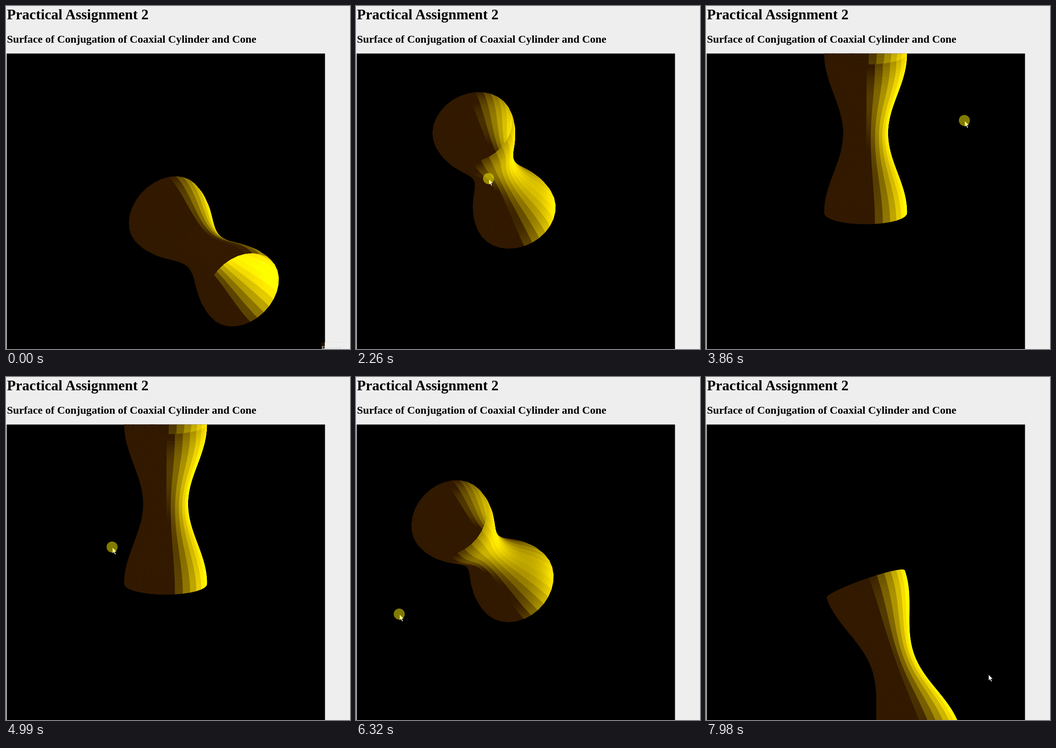
Animation of 750 by 747 pixels, one loop 8000 ms. Source, as an HTML page with a canvas:

```html
<!DOCTYPE html>
<html lang="en">
<head>
<meta charset="utf-8">
<title>Practical Assignment 2</title>
<style>
  html, body { margin: 0; width: 100%; height: 100%; overflow: hidden; background: #eee; }
  h1, h2 { position: absolute; left: 2px; margin: 0; white-space: nowrap; color: #000;
           font-family: "Liberation Serif", "Times New Roman", serif; font-weight: bold; }
  h1 { top: 0; font-size: 31.6px; line-height: 37px; }
  h2 { top: 58px; font-size: 23.76px; line-height: 28px; }
  canvas { position: absolute; left: 0; top: 0; }
</style>
</head>
<body>
<canvas id="stage" width="750" height="747"></canvas>
<h1>Practical Assignment 2</h1>
<h2>Surface of Conjugation of Coaxial Cylinder and Cone</h2>
<script>
const ctx = document.getElementById('stage').getContext('2d');
const LOOP = 8000, TAU = Math.PI * 2;
const CENTER = { x: 348, y: 451 };
const LENGTH = 360, MEAN_RADIUS = 69.25, SWELL = 20.75;
const FACETS = 31, ROWS = 48, PHASE = .07;
const LAMP = [650, 0, 0];
const DRAG_START = 530, DRAG_END = 7930;

// Turning points of the drag: time, axis of the body, pointer
const TURNS = [
  { t: DRAG_START, axis: [.463, -.463], pointer: [568, 633] },
  { t: 1610, axis: [-.186, -.04], pointer: [278, 579] },
  { t: 2130, axis: [-.265, .435], pointer: [285, 415] },
  { t: 2930, axis: [-.179, .824], pointer: [350, 225] },
  { t: 3860, axis: [0, .964], pointer: [564, 250] },
  { t: 4990, axis: [0, .968], pointer: [232, 371] },
  { t: 5580, axis: [0, .95], pointer: [475, 400] },
  { t: 5950, axis: [0, .1], pointer: [300, 676] },
  { t: 6320, axis: [-.4, .398], pointer: [95, 517] },
  { t: 6600, axis: [-.8, -.12], pointer: [90, 650] },
  { t: 7180, axis: [-.387, -.54], pointer: [420, 577] },
  { t: 7980, axis: [.33, -.937], pointer: [616, 648] }
];

const clamp = (v, lo, hi) => Math.min(hi, Math.max(lo, v));
const dot = (a, b) => a[0] * b[0] + a[1] * b[1] + a[2] * b[2];
const normalize = v => v.map(c => c / Math.hypot(...v));
const cross = (a, b) => [
  a[1] * b[2] - a[2] * b[1], a[2] * b[0] - a[0] * b[2], a[0] * b[1] - a[1] * b[0]];

function slope(i, part, k) {
  const from = TURNS[i], to = TURNS[i + 1];
  return (to[part][k] - from[part][k]) / (to.t - from.t);
}

// Harmonic mean of neighbouring slopes: smooth without overshoot
function tangent(i, part, k) {
  if (i === 0 || i === TURNS.length - 1) return slope(Math.max(0, i - 1), part, k);
  const p = slope(i - 1, part, k), q = slope(i, part, k);
  return p * q > 0 ? 2 * p * q / (p + q) : 0;
}

function valueAt(time, part) {
  const last = TURNS.length - 1, t = clamp(time, TURNS[0].t, TURNS[last].t);
  let i = 0;
  while (i < last - 1 && t >= TURNS[i + 1].t) i++;
  const from = TURNS[i], to = TURNS[i + 1], span = to.t - from.t;
  const u = (t - from.t) / span, u2 = u * u, u3 = u2 * u;
  return [0, 1].map(k =>
    (2 * u3 - 3 * u2 + 1) * from[part][k] + (3 * u2 - 2 * u3) * to[part][k] +
    span * ((u3 - 2 * u2 + u) * tangent(i, part, k) + (u3 - u2) * tangent(i + 1, part, k)));
}

function shade(normal, place) {
  const toLamp = normalize(LAMP.map((v, k) => v - place[k]));
  const lit = 245 * Math.max(0, dot(normal, toLamp));
  return `rgb(${Math.min(255, 50 + lit) | 0},${Math.min(255, 25 + lit) | 0},0)`;
}

function drawSurface([ax, ay]) {
  const axis = normalize([ax, ay, Math.sqrt(Math.max(0, 1 - ax * ax - ay * ay))]);
  const side = normalize([1 - axis[0] ** 2, -axis[0] * axis[1], -axis[0] * axis[2]]);
  const up = cross(axis, side);
  const around = i => {
    const angle = PHASE + i * TAU / FACETS, c = Math.cos(angle), s = Math.sin(angle);
    return side.map((v, k) => v * c + up[k] * s);
  };
  const radius = j => MEAN_RADIUS + SWELL * Math.cos(TAU * j / ROWS);
  const grade = j => -SWELL * TAU / LENGTH * Math.sin(TAU * j / ROWS);
  const point = (dir, j) => dir.map((v, k) => v * radius(j) + axis[k] * LENGTH * j / ROWS);

  const quads = [];
  for (let i = 0; i < FACETS; i++) {
    const a = around(i), b = around(i + 1), mid = around(i + .5);
    for (let j = 0; j < ROWS; j++) {
      const place = point(mid, j + .5);
      const normal = normalize(mid.map((v, k) => v - grade(j + .5) * axis[k]));
      quads.push({
        corners: [point(a, j), point(b, j), point(b, j + 1), point(a, j + 1)],
        depth: place[2],
        color: shade(normal, place)
      });
    }
  }
  quads.sort((p, q) => p.depth - q.depth);

  ctx.lineWidth = .9;
  ctx.lineJoin = 'round';
  for (const { corners, color } of quads) {
    ctx.beginPath();
    for (const p of corners) ctx.lineTo(CENTER.x + p[0], CENTER.y - p[1]);
    ctx.closePath();
    ctx.fillStyle = ctx.strokeStyle = color;
    ctx.fill();
    ctx.stroke();
  }
}

function drawPointer([x, y], pressed) {
  ctx.save();
  ctx.translate(x, y);
  const arrow = new Path2D('M0 0V13.5L3.1 10.6L5.4 15.6L7.7 14.6L5.5 9.7H9.7Z');
  ctx.fillStyle = '#fff';
  ctx.strokeStyle = '#000';
  ctx.lineWidth = .9;
  ctx.fill(arrow);
  ctx.stroke(arrow);
  if (pressed) {
    ctx.fillStyle = 'rgba(255,245,0,.5)';
    ctx.beginPath();
    ctx.arc(-.7, -.8, 12, 0, TAU);
    ctx.fill();
  }
  ctx.restore();
}

function drawButton() {
  ctx.fillStyle = 'rgb(38,18,4)';
  ctx.fillRect(688, 733, 7, 14);
  ctx.strokeStyle = '#e4e4e4';
  ctx.lineWidth = 1;
  ctx.strokeRect(695.5, 732.5, 41, 20);
  ctx.fillStyle = '#d8d8d8';
  ctx.font = '13px "Liberation Sans", Arial, sans-serif';
  ctx.fillText('Record', 688, 750);
}

function draw(time) {
  ctx.clearRect(0, 0, 750, 747);
  ctx.save();
  ctx.beginPath();
  ctx.rect(1.5, 103.5, 694, 644);
  ctx.clip();
  ctx.fillStyle = '#000';
  ctx.fillRect(0, 100, 750, 647);
  drawSurface(valueAt(time, 'axis'));
  ctx.restore();

  if (time < 140) drawButton();
  if (time >= 70) {
    const away = 1 - clamp((time - 70) / 200, 0, 1);
    const [x, y] = valueAt(time, 'pointer');
    drawPointer([x + 144 * away, y + 112 * away], time >= DRAG_START && time < DRAG_END);
  }
}

const start = performance.now();
function tick() {
  draw((performance.now() - start) % LOOP);
  requestAnimationFrame(tick);
}
tick();
</script>
</body>
</html>
```
